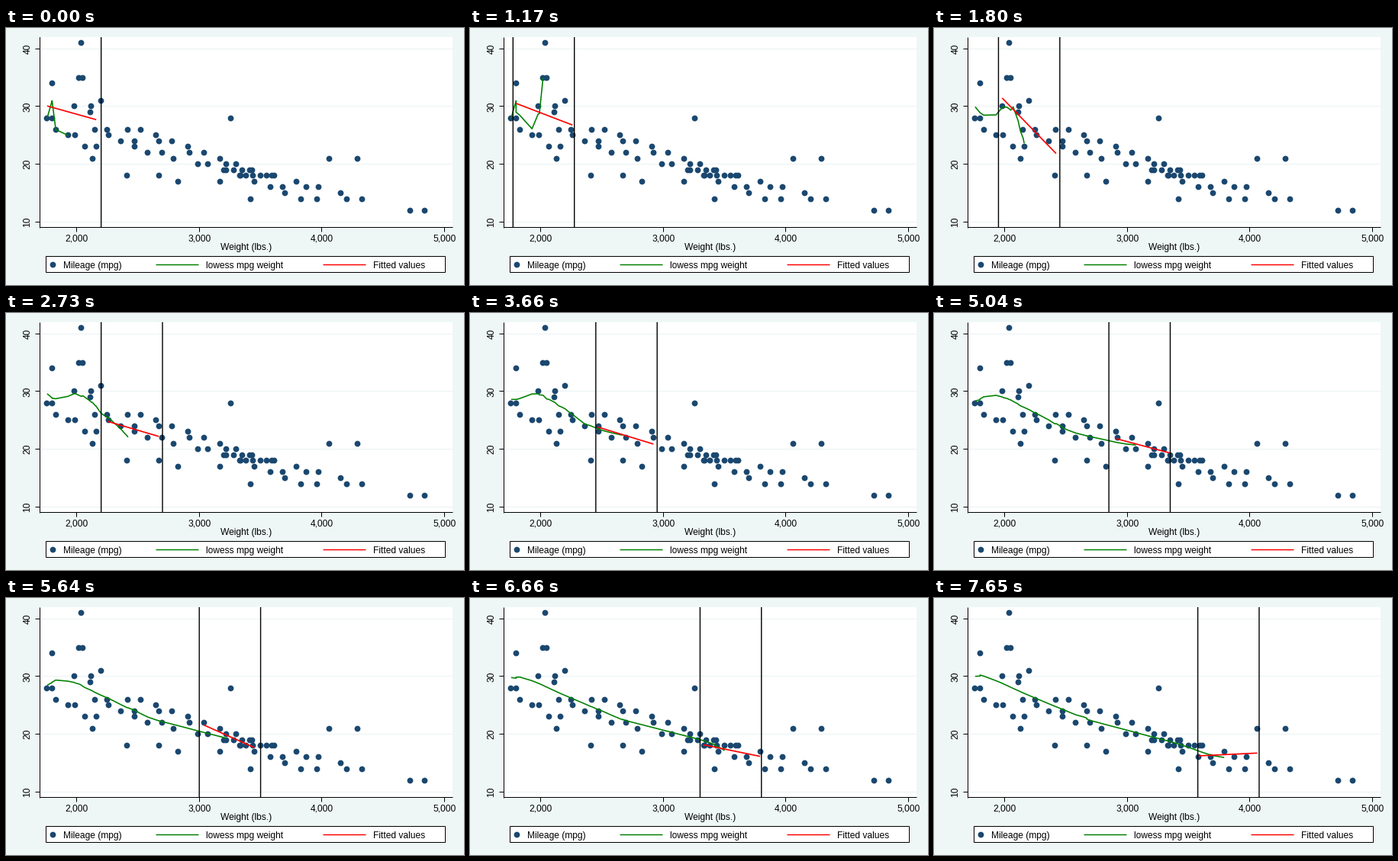
A matplotlib script that plays this animation: 600 px wide and 337 px high, repeating every 7.68 s.

```python
import numpy as np
import matplotlib.pyplot as plt
from matplotlib.animation import FuncAnimation
from matplotlib.patches import Rectangle

W, H, DPI = 600, 337, 64
PX = 72 / DPI  # points per pixel
FRAMES, INTERVAL = 256, 30
HOLD, STEP_FRAMES = 30, 3
START, STEP, HALF = 1950, 25, 250
LEFT, RIGHT, TOP, BOTTOM = 44, 585, 12, 262

BACK, GRID = "#eef7f6", "#eaf2f3"
NAVY, GREEN, RED = "#1a476f", "#008000", "#ff0000"

plt.rcParams["font.family"] = "Liberation Sans"

# light and unusual cars: mileage -> weights in tens of pounds
OUTLIERS = {
    12: [472, 484], 14: [342], 17: [283, 317], 18: [241, 267],
    21: [213, 406, 429], 23: [207, 216], 25: [193, 199], 26: [183],
    28: [176, 180, 326], 29: [211], 30: [198, 212], 31: [220],
    34: [180], 35: [202, 205], 41: [204],
}


def main_band():
    """Rows of cars in a band that falls with mileage, densest near 18.5."""
    for m in range(14, 27):
        lo = np.interp(m, [14, 19, 22, 26], [383, 320, 258, 215])
        hi = np.interp(m, [14, 19, 26], [433, 343, 252])
        n = (2 if m % 2 else 4) + (4 if m in (18, 19) else 0)
        t = np.linspace(0, 1, n)
        for w in lo + (hi - lo) * t * t * (3 - 2 * t):
            yield 10 * round(w), m


cars = [(10 * w, m) for m, ws in OUTLIERS.items() for w in ws]
weight, mpg = np.array(sorted([*cars, *main_band()]), float).T


def px(w):
    return 92.5 + (np.asarray(w) - 2000) * 0.1607


def py(m):
    return 27.2 + (40 - np.asarray(m)) * 7.57


def line_fit(x, y, w):
    """Weighted least squares: value at x = 0 and slope."""
    mx, my = np.average(x, weights=w), np.average(y, weights=w)
    sxx = np.sum(w * (x - mx) ** 2)
    slope = np.sum(w * (x - mx) * (y - my)) / sxx if sxx > 0 else 0
    return my - slope * mx, slope


def lowess(x, y, width=0.8):
    n = len(x)
    k = int((n * width - 0.5) / 2)
    out = np.empty(n)
    for i in range(n):
        near = slice(max(0, i - k), min(n, i + k + 1))
        d = x[near] - x[i]
        tri = (1 - np.abs(d / (1.0001 * np.abs(d).max())) ** 3) ** 3
        out[i] = line_fit(d, y[near], tri)[0]
    return out


fig = plt.figure(figsize=(W / DPI, H / DPI), dpi=DPI, facecolor=BACK)
ax = fig.add_axes([0, 0, 1, 1])
ax.set_xlim(0, W)
ax.set_ylim(H, 0)
ax.axis("off")


def stroke(x, y, color, width, z, snap=False):
    return ax.plot(x, y, color=color, lw=width * PX, zorder=z, snap=snap,
                   solid_capstyle="butt")[0]


def rule(x, y, color="black", z=6):
    # half a pixel back, because snapping rounds upwards
    stroke(np.subtract(x, 0.5), np.subtract(y, 0.5), color, 1, z, True)


def label(x, y, s, ha="center", va="baseline", **kw):
    ax.text(x, y, s, fontsize=12 * PX, ha=ha, va=va, zorder=8, **kw)


def dots(x, y):
    ax.plot(np.subtract(x, 0.5), np.subtract(y, 0.5), "o", color=NAVY,
            ms=7.8 * PX, mew=0, zorder=3, antialiased=False)


def box(x, y, w, h, **kw):
    return ax.add_patch(Rectangle((x, y), w, h, fc="white", zorder=0, **kw))


# plot region and axes
region = box(LEFT, TOP, RIGHT - LEFT, BOTTOM - TOP, lw=0)
for m in (10, 20, 30, 40):
    y = py(m)
    rule([LEFT, RIGHT], [y, y], GRID, 1)
    rule([38.5, 44.5], [y, y])
    label(28.6, y, str(m), va="center", rotation=90)
for w in (2000, 3000, 4000, 5000):
    x = px(w)
    rule([x, x], [261.5, 267.5])
    label(x, 279.3, f"{w:,}")
rule([44.5, 44.5], [TOP, BOTTOM])
rule([LEFT, RIGHT], [261.5, 261.5])
label(314.3, 290.8, "Weight (lbs.)")
dots(px(weight), py(mpg))

# legend
box(52, 299, 523, 21, ec="black", lw=PX)
dots([61.9], [310.3])
stroke([196.5, 252.5], [310.5, 310.5], GREEN, 1.5, 2)
stroke([415.5, 471.5], [310.5, 310.5], RED, 1.5, 2)
for x, s in ((75, "Mileage (mpg)"), (262.3, "lowess mpg weight"),
             (481.3, "Fitted values")):
    label(x, 314.8, s, ha="left")

# moving parts
smooth = stroke([], [], GREEN, 1.6, 4)
fitted = stroke([], [], RED, 1.7, 5)
bounds = [stroke([], [], "black", 1.4, 5.5) for _ in range(2)]
for line in bounds:
    line.set_clip_path(region)


def update(frame):
    mid = START + STEP * max(0, (frame - HOLD) // STEP_FRAMES)
    lo, hi = mid - HALF, mid + HALF
    for line, w in zip(bounds, (lo, hi)):
        line.set_data([px(w)] * 2, [TOP, BOTTOM])

    past = weight < mid
    smooth.set_data(px(weight[past]), py(lowess(weight[past], mpg[past])))

    inside = (weight > lo) & (weight < hi)
    x = weight[inside]
    a, b = line_fit(x - mid, mpg[inside], np.ones(len(x)))
    ends = np.array([x[0], x[-1]])
    fitted.set_data(px(ends), py(a + b * (ends - mid)))
    return [smooth, fitted, *bounds]


anim = FuncAnimation(fig, update, frames=FRAMES, interval=INTERVAL,
                     init_func=lambda: update(0), repeat=True,
                     repeat_delay=0, blit=False)
plt.show()
```
